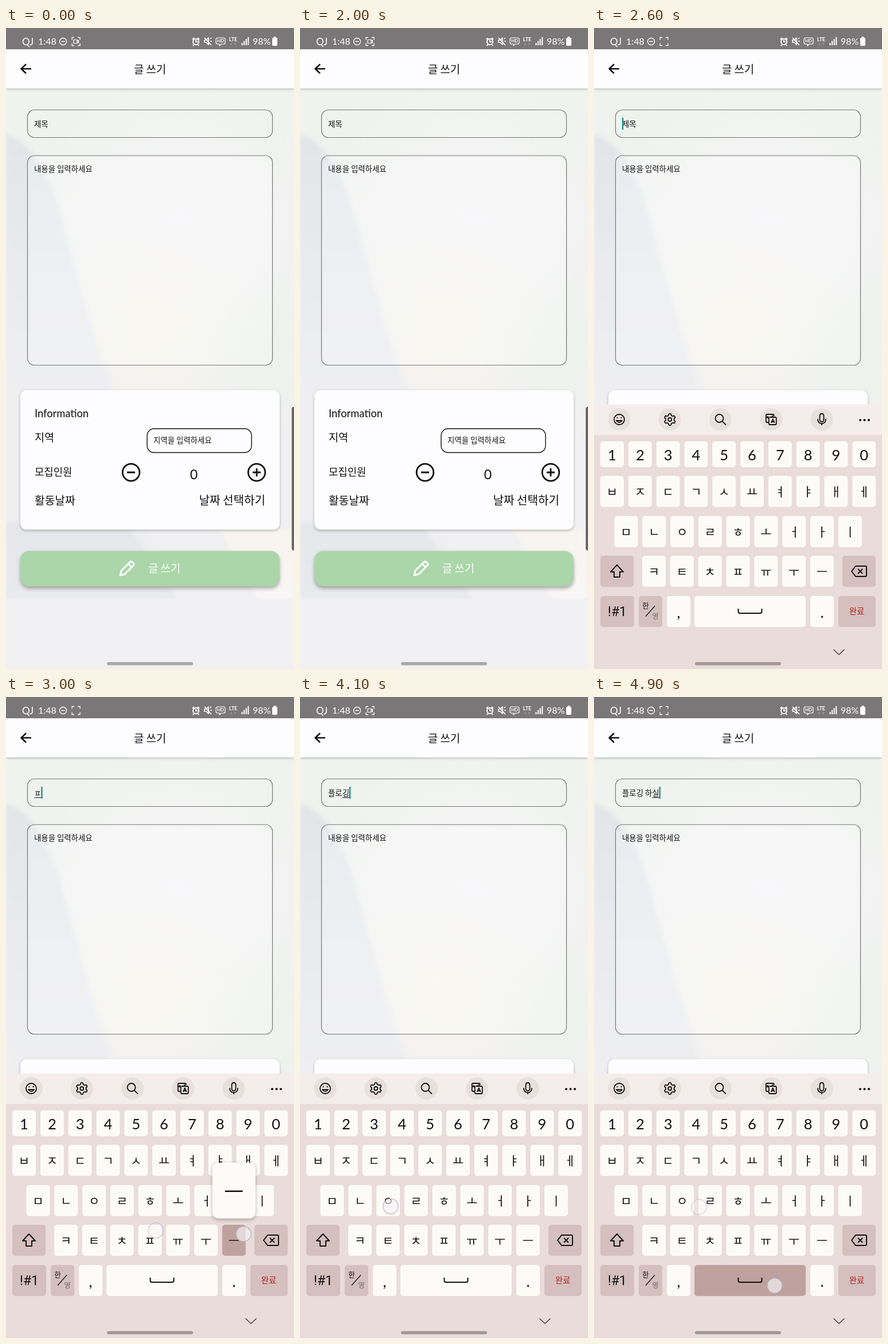
An HTML page with a canvas that plays this animation: 502x1115 px, repeating every 5000 ms.

```html
<!DOCTYPE html>
<html lang="ko">
<head>
<meta charset="utf-8">
<title>글 쓰기</title>
<style>
  html, body { margin: 0; width: 502px; height: 1115px; overflow: hidden; }
  canvas { display: block; }
</style>
</head>
<body>
<canvas id="stage" width="502" height="1115"></canvas>
<script>
const W = 502, H = 1115, LOOP = 5000;
const KB_TOP = 655, KB_START = 2300, KB_TIME = 300, KB_TRAVEL = 440;
const INK = '#111', KEY = '#fdfbf8', FUNC = '#d5bfbf', PRESSED = '#bfa29e';
const HANGUL = '"Noto Sans CJK KR", "Noto Sans CJK JP", sans-serif';
const LATIN = 'Lato, "Noto Sans", sans-serif';
const INPUT_SIZE = 13.4;

let ctx;

function text(str, x, cy, size, { color = INK, align = 'left', weight = 400, font = HANGUL } = {}) {
  ctx.font = `${weight} ${size}px ${font}`;
  ctx.fillStyle = color;
  ctx.textAlign = align;
  ctx.fillText(str, x, cy + size * 0.36);
}

function box(x, y, w, h, r, fill, stroke, line = 1) {
  ctx.beginPath();
  ctx.roundRect(x, y, w, h, r);
  if (fill) { ctx.fillStyle = fill; ctx.fill(); }
  if (stroke) { ctx.strokeStyle = stroke; ctx.lineWidth = line; ctx.stroke(); }
}

function raised(blur, dy, alpha, draw) {
  ctx.save();
  ctx.shadowColor = `rgba(0,0,0,${alpha})`;
  ctx.shadowBlur = blur;
  ctx.shadowOffsetY = dy;
  draw();
  ctx.restore();
}

function disc(x, y, r, fill) {
  ctx.beginPath();
  ctx.arc(x, y, r, 0, Math.PI * 2);
  ctx.fillStyle = fill;
  ctx.fill();
}

// Strokes an SVG path whose origin is the icon's centre.
function icon(x, y, d, line = 2, color = INK) {
  ctx.save();
  ctx.translate(x, y);
  ctx.lineWidth = line;
  ctx.strokeStyle = color;
  ctx.lineJoin = 'round';
  ctx.stroke(new Path2D(d));
  ctx.restore();
}

const ring = (r, x = 0, y = 0) => `M${x + r} ${y}A${r} ${r} 0 1 1 ${x - r} ${y}A${r} ${r} 0 1 1 ${x + r} ${y}`;

function glow(x, y, r, rgb, alpha) {
  const g = ctx.createRadialGradient(x, y, 0, x, y, r);
  g.addColorStop(0, `rgba(${rgb},${alpha})`);
  g.addColorStop(1, `rgba(${rgb},0)`);
  ctx.fillStyle = g;
  ctx.fillRect(0, 105, W, 890);
}

function shade(d, y0, y1, from, to) {
  const g = ctx.createLinearGradient(0, y0, 0, y1);
  g.addColorStop(0, from);
  g.addColorStop(1, to);
  ctx.fillStyle = g;
  ctx.fill(new Path2D(d));
}

function layer(draw) {
  const canvas = document.createElement('canvas');
  canvas.width = W;
  canvas.height = H;
  ctx = canvas.getContext('2d');
  draw();
  return canvas;
}

function drawBackdrop() {
  ctx.fillStyle = '#f1f0f2';
  ctx.fillRect(0, 0, W, H);
  ctx.save();
  ctx.beginPath();
  ctx.rect(0, 105, W, 889);
  ctx.clip();
  shade('M0 105H502V994H0Z', 105, 600, '#eff3ee', '#f1f0f2');
  glow(300, 340, 260, '247,245,248', 0.9);
  glow(470, 560, 170, '236,243,235', 0.8);
  glow(250, 520, 190, '247,246,236', 0.9);
  ctx.filter = 'blur(3px)';
  shade('M0 185C50 200 75 260 95 325C115 400 140 500 190 640L280 994H0Z', 185, 650, '#e2e6e9', '#efeff2');
  shade('M0 860H210L300 994H0Z', 860, 994, '#e5e7eb', '#e9eaee');
  shade('M370 870H502V994H440Z', 870, 994, '#f8f4ee', '#f8f6f6');
  ctx.filter = 'none';
  ctx.restore();
}

function drawHeader() {
  raised(5, 1, 0.28, () => box(0, 37, W, 68, 0, '#fdfcfe'));
  ctx.fillStyle = '#7a7778';
  ctx.fillRect(0, 0, W, 37);
  icon(35, 71, 'M9 0H-8M0 -8L-8.5 0L0 8', 2.5);
  text('글 쓰기', 251, 72, 18.8, { align: 'center' });

  const white = { color: '#fff', font: LATIN };
  text('QJ', 28, 23.5, 17, white);
  text('1:48', 56, 23.5, 16, white);
  text('98%', 430, 23.5, 16, white);
  icon(99.5, 23.5, ring(6) + 'M-3 0H3', 1.3, '#fff');
  icon(122, 23.5, 'M-7 -3V-7H-3M3 -7H7V-3M7 3V7H3M-3 7H-7V3', 1.3, '#fff');
  icon(331, 24, ring(5) + 'M0 -3V0H3M-6 -4L-3 -7M6 -4L3 -7M-4 5L-5 7M4 5L5 7', 2, '#fff');
  icon(352, 23, 'M-6 -2H-3L1 -6V6L-3 2H-6ZM-6 -6L6 7M4 -4L6 -6M4 0H7', 1.7, '#fff');
  icon(374, 23, 'M-5 -6H5Q8 -6 8 -3V2Q8 5 5 5H1L-2 8V5H-5Q-8 5 -8 2V-3Q-8 -6 -5 -6Z', 1.2, '#fff');
  text('HD', 374, 22.5, 8, { ...white, align: 'center', weight: 700 });
  text('LTE', 396, 19.5, 9, { ...white, align: 'center', weight: 700 });
  icon(396, 28, 'M-3 -2V2L-5 0M3 2V-2L5 0', 1, '#aaa7a8');
  for (let i = 0; i < 4; i++) box(410.5 + i * 3.6, 26 - i * 3.4, 2, 4 + i * 3.4, 0, '#fff');
  box(464, 17, 9, 14, 2, '#fff');
  box(466.5, 15, 4, 3, 1, '#fff');
}

function drawForm() {
  box(37.5, 142.5, 427, 48, 12, null, '#777', 1.2);
  box(37.5, 222, 427, 364.5, 12, 'rgba(255,252,255,.22)', '#777', 1.2);
  text('내용을 입력하세요', 49, 245, INPUT_SIZE);

  raised(5, 2, 0.25, () => box(25, 630, 452, 242.5, 11, '#fdfcfe'));
  text('Information', 50, 670.5, 18.3, { font: LATIN });
  text('지역', 50, 712, 18.5);
  box(246, 697, 182, 41.5, 12, '#fdfcfe', INK, 1.4);
  text('지역을 입력하세요', 257, 717, INPUT_SIZE);
  text('모집인원', 50, 773, 17.8);
  icon(218, 773, ring(14.8) + 'M-7 0H7', 2.8);
  text('0', 327.5, 777, 23, { align: 'center', font: LATIN });
  icon(437, 773, ring(14.8) + 'M-7 0H7M0 -7V7', 2.8);
  text('활동날짜', 50, 822, 19.2);
  text('날짜 선택하기', 452, 822, 20.1, { align: 'right' });

  raised(6, 4, 0.3, () => box(25, 909.5, 452, 61.5, 16, '#abd6a9'));
  icon(211, 940, 'M-12 12L-10 4L5 -11Q7 -13 9 -11L11 -9Q13 -7 11 -5L-4 10ZM2 -8L8 -2', 3, '#fff');
  text('글 쓰기', 276, 940.5, 18.8, { color: '#fff', align: 'center', weight: 500 });
}

const keys = {};
const PITCH = 48.8;

function addRow(labels, x, y, h) {
  [...labels].forEach((label, i) => { keys[label] = { label, x: x + i * PITCH, y, w: 41, h }; });
}
addRow('1234567890', 11, 719, 45);
addRow('ㅂㅈㄷㄱㅅㅛㅕㅑㅐㅔ', 11, 779, 54);
addRow('ㅁㄴㅇㄹㅎㅗㅓㅏㅣ', 35.5, 849, 54);
addRow('ㅋㅌㅊㅍㅠㅜㅡ', 84, 918, 54);
keys[','] = { label: ',', x: 127, y: 988, w: 41, h: 54 };
keys['.'] = { label: '.', x: 377, y: 988, w: 41, h: 54 };
keys[' '] = { label: ' ', x: 175, y: 988, w: 194, h: 54 };

function drawKey(key, fill = KEY) {
  const { label, x, y, w, h } = key;
  const cx = x + w / 2, cy = y + h / 2;
  box(x, y, w, h, 5, fill);
  if (label === ' ') icon(cx, cy - 1, 'M-20.5 -4V1Q-20.5 4 -17.5 4H17.5Q20.5 4 20.5 1V-4', 2);
  else if (/\d/.test(label)) text(label, cx, cy + 1, 25.5, { align: 'center', font: LATIN });
  else if (/[,.]/.test(label)) text(label, cx, cy + 2, 26, { align: 'center', font: LATIN });
  else text(label, cx, cy, 21, { align: 'center', weight: 500 });
}

function gearPath() {
  let d = '';
  for (let i = 0; i <= 72; i++) {
    const a = i * Math.PI / 36, r = 8.6 + 1.3 * Math.tanh(3 * Math.cos(6 * a));
    d += `${i ? 'L' : 'M'}${r * Math.sin(a)} ${-r * Math.cos(a)}`;
  }
  return d + 'Z' + ring(3);
}

function drawKeyboard() {
  ctx.fillStyle = '#e9dcda';
  ctx.fillRect(0, KB_TOP, W, H);
  ctx.fillStyle = '#f4edeb';
  ctx.fillRect(0, KB_TOP, W, 53);
  const tools = [
    ring(9) + 'M-5 2Q0 8 5 2ZM-3.5 -4V-2M3.5 -4V-2',
    gearPath(),
    ring(7, -2, -2) + 'M3 3L9.5 9.5',
    'M-5 5H-7Q-9 5 -9 3V-7Q-9 -9 -7 -9H3Q5 -9 5 -7V-6M-3 -4H7Q9 -4 9 -2V7Q9 9 7 9H-2Q-4 9 -4 7V-3M0 6L3 -1L6 6M1 4H5M-6 -2V-5L-8 -3M-6 -5L-4 -3M1 -6H4',
    'M-3.5 -6Q-3.5 -10 0 -10Q3.5 -10 3.5 -6V0Q3.5 4 0 4Q-3.5 4 -3.5 0ZM-7 -1Q-7 7 0 7Q7 7 7 -1M0 7V10'
  ];
  tools.forEach((d, i) => {
    const x = 44 + i * 88.25;
    disc(x, 681, 19.5, '#e9dfdd');
    icon(x, 681, d, 1.8);
  });
  [-7.5, 0, 7.5].forEach(dx => disc(471.5 + dx, 682, 2.1, INK));

  Object.values(keys).forEach(key => drawKey(key));
  box(11, 918, 58, 54, 5, FUNC);
  icon(40, 945, 'M0 -11L11 1H5V10H-5V1H-11Z', 2);
  box(433, 918, 58, 54, 5, FUNC);
  icon(462, 945, 'M-13 0L-6 -9H11Q13 -9 13 -7V7Q13 9 11 9H-6ZM-2 -4L6 4M6 -4L-2 4', 2);
  box(11, 988, 59, 54, 5, FUNC);
  text('!#1', 40.5, 1014.5, 23, { align: 'center', font: 'Roboto, sans-serif' });
  box(78, 988, 41, 54, 5, FUNC);
  text('한', 90, 1005, 12.5, { align: 'center' });
  text('영', 107, 1023, 12.5, { align: 'center', color: '#776b6b' });
  icon(98, 1014.5, 'M-8 9L8 -9', 1.2);
  box(426, 988, 65, 54, 5, FUNC);
  text('완료', 458, 1015, 14.5, { align: 'center', color: '#b02418' });
  icon(427, 1085, 'M-9.5 -4L0 5L9.5 -4', 1.6, '#4d4545');
}

// Touches: time, key, finger position, and the text once the press is committed.
const HOLD = 90, COMMIT = 100, FADE_END = 270;
const touches = [
  [2200, null, 73, 165, ''],
  [2840, 'ㅍ', 261, 928, 'ㅍ'],
  [2960, 'ㅡ', 414, 934, '프'],
  [3140, 'ㄹ', 208, 884, '플'],
  [3300, 'ㄹ', 205, 882, '플ㄹ'],
  [3520, 'ㅗ', 299, 877, '플로'],
  [3720, 'ㄱ', 183, 818, '플록'],
  [3840, 'ㅣ', 452, 888, '플로기'],
  [3980, 'ㅇ', 158, 886, '플로깅'],
  [4120, ' ', 310, 1022, '플로깅 '],
  [4250, 'ㅎ', 241, 882, '플로깅 ㅎ'],
  [4370, 'ㅏ', 405, 899, '플로깅 하'],
  [4500, 'ㅅ', 232, 818, '플로깅 핫'],
  [4610, 'ㅣ', 452, 890, '플로깅 하시'],
  [4720, 'ㄹ', 183, 887, '플로깅 하실'],
  [4870, ' ', 315, 1024, '플로깅 하실 ']
].map(([at, label, x, y, typed]) => ({ at, label, x, y, typed }));

const cameraHidden = [[300, 800], [1300, 1700], [2600, 3100], [3500, 4100], [4700, 5000]];

function drawInput(t) {
  const done = touches.filter(touch => t >= touch.at + COMMIT);
  const typed = done.length ? done[done.length - 1].typed : '';
  text(typed || '제목', 49, 167, INPUT_SIZE);
  const end = typed ? 49 + ctx.measureText(typed).width : 49;
  if (typed && !typed.endsWith(' ')) {
    const start = 49 + ctx.measureText(typed.slice(0, -1)).width;
    ctx.fillRect(start, 174.5, end - start, 1);
  }
  const caretOn = t >= 2200 || (t + 900) % 1000 < 500;
  if (caretOn) box(end, 156, 2.2, 21, 0, '#128a7b');
}

function drawPress({ at, label }, t) {
  if (!label || t < at || t >= at + HOLD) return;
  const key = keys[label];
  drawKey(key, PRESSED);
  if (label === ' ') return;
  const cx = key.x + key.w / 2, top = key.y - 108;
  raised(7, 2, 0.28, () => box(cx - 37.5, top, 75, 97, 10, KEY));
  text(label, cx, top + 50, 38, { align: 'center' });
}

function drawTouch({ at, x, y }, t) {
  const age = t - at;
  if (age < 0 || age > FADE_END) return;
  ctx.save();
  ctx.globalAlpha = Math.min(1, (FADE_END - age) / (FADE_END - HOLD));
  disc(x, y, 13, 'rgba(245,240,246,.68)');
  icon(x, y, ring(13.2), 1.6, 'rgba(176,172,192,.8)');
  ctx.restore();
}

const page = layer(() => { drawBackdrop(); drawHeader(); drawForm(); });
const keyboard = layer(drawKeyboard);
ctx = document.getElementById('stage').getContext('2d');

function render(t) {
  ctx.drawImage(page, 0, 0);
  if (!cameraHidden.some(([from, to]) => t >= from && t < to)) {
    icon(122, 23.5, 'M-4 -3H2V3H-4ZM2 -1L4.5 -2.5V2.5L2 1', 1.2, '#fff');
  }
  drawInput(t);

  if (t >= KB_START) {
    const u = Math.min(1, (t - KB_START) / KB_TIME);
    ctx.fillStyle = '#f9f7fa';
    ctx.fillRect(0, KB_TOP, W, H - KB_TOP);
    ctx.save();
    ctx.globalAlpha = Math.min(1, u * 1.6);
    ctx.drawImage(keyboard, 0, KB_TRAVEL * (1 - u) ** 2);
    ctx.restore();
  }
  if (t < 2600) box(498, 659, 8, 250, 4, '#696768');

  touches.forEach(touch => drawPress(touch, t));
  touches.forEach(touch => drawTouch(touch, t));
  box(176, 1103, 150, 5.5, 2.75, t < KB_START ? '#a8a7a9' : '#a19999');
}

const began = performance.now();
function tick() {
  render((performance.now() - began) % LOOP);
  requestAnimationFrame(tick);
}
tick();
</script>
</body>
</html>
```
